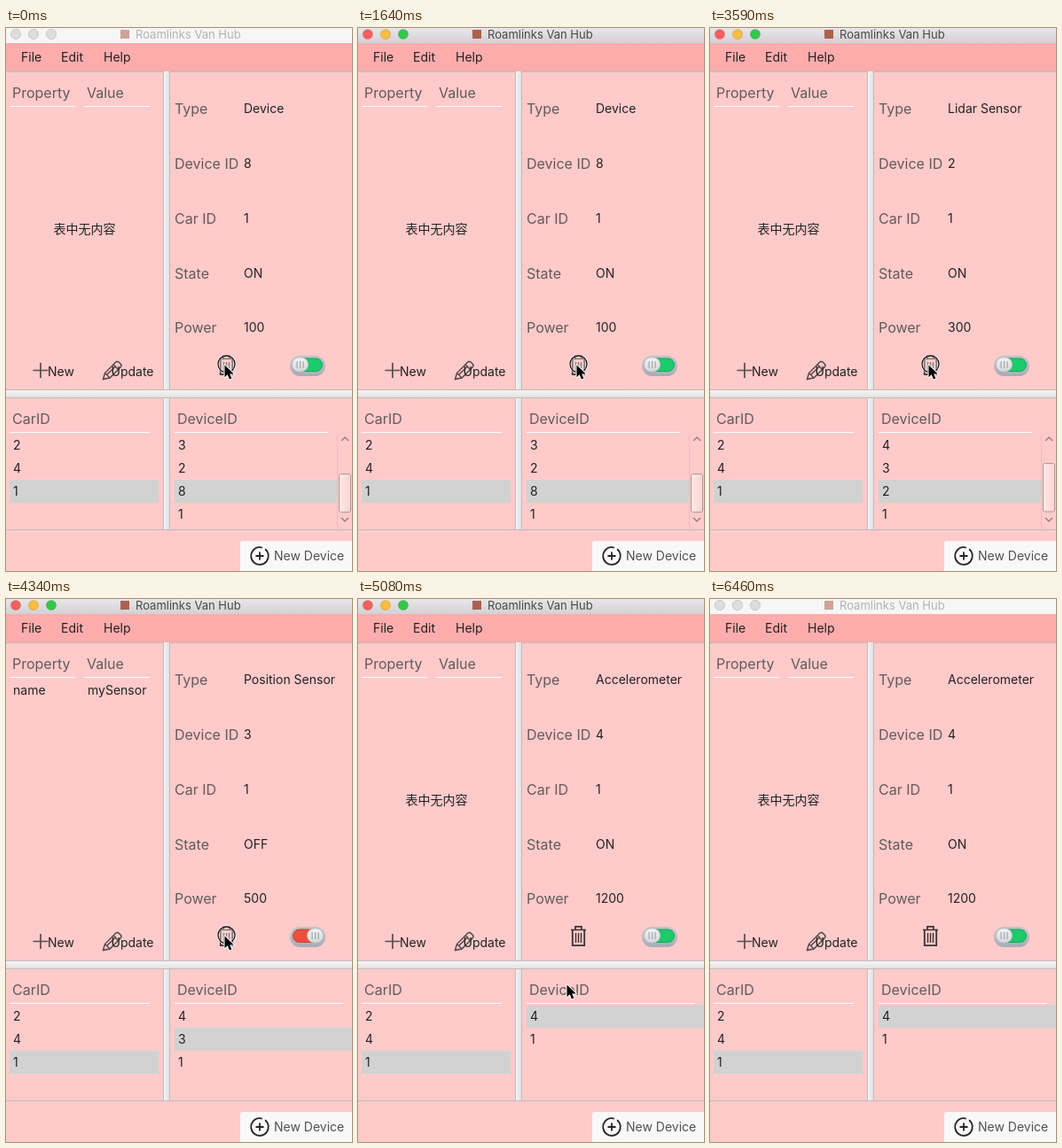
Write an HTML page with a canvas that moves like this. It is 390 by 613 pixels and loops after 6.56 s.

```html
<!DOCTYPE html>
<html lang="en">
<head>
<meta charset="utf-8">
<title>Device panel</title>
<style>
html, body { margin: 0; width: 100%; height: 100%; overflow: hidden; background: #ffcaca; }
canvas { display: block; }
</style>
</head>
<body>
<canvas id="stage" width="390" height="613"></canvas>
<script>
const ctx = document.getElementById('stage').getContext('2d');
const LOOP = 6560;
const INK = '#222', LABEL = '#625a5c', PINK = '#ffcaca', EDGE = '#c3b9ba';

// Each list holds [start time, value] steps.
const DEVICES = [
  [0, { type: 'Device', id: 8, on: true, power: 100, list: [3, 2, 8, 1], thumb: 503 }],
  [1790, { type: 'Lidar Sensor', id: 2, on: true, power: 300, list: [4, 3, 2, 1], thumb: 491 }],
  [3740, { type: 'Position Sensor', id: 3, on: false, power: 500, list: [4, 3, 1], prop: ['name', 'mySensor'] }],
  [4490, { type: 'Accelerometer', id: 4, on: true, power: 1200, list: [4, 1] }]
];
const CURSOR = [
  [0, [245, 379]], [5080, [234, 434]], [5230, [190, 514]], [5380, [163, 522]],
  [5530, [170, 530]], [5680, [283, 563]], [5820, null]
];
const PRESSED = [
  [0, true], [140, false], [1640, true], [1790, false],
  [3590, true], [3740, false], [4340, true], [4490, false]
];
const ACTIVE = [[0, false], [1640, true], [6460, false]];

const at = (steps, t) => steps.filter(s => s[0] <= t).pop()[1];

function rect(x, y, w, h, fill) {
  ctx.fillStyle = fill;
  ctx.fillRect(x, y, w, h);
}

function shape(path, fill, stroke, width = 1) {
  if (fill) { ctx.fillStyle = fill; ctx.fill(path); }
  if (stroke) { ctx.strokeStyle = stroke; ctx.lineWidth = width; ctx.stroke(path); }
}

function round(x, y, w, h, r, fill, stroke, width) {
  const p = new Path2D();
  p.roundRect(x, y, w, h, r);
  shape(p, fill, stroke, width);
}

function circle(x, y, r, fill, stroke, width) {
  round(x - r, y - r, 2 * r, 2 * r, r, fill, stroke, width);
}

const line = (d, color, width) => shape(new Path2D(d), null, color, width);

function text(s, x, y, color = INK, size = 14) {
  ctx.font = `${size}px Inter, "Noto Sans CJK SC", "Noto Sans CJK", sans-serif`;
  ctx.fillStyle = color;
  ctx.fillText(s, x, y);
}

function shade(x0, y0, x1, y1, ...colors) {
  const g = ctx.createLinearGradient(x0, y0, x1, y1);
  colors.forEach((c, i) => g.addColorStop(i / (colors.length - 1), c));
  return g;
}

function titleBar(active) {
  rect(0, 0, 390, 17, active ? shade(0, 0, 0, 17, '#e8e6e8', '#d3d1d3') : '#f6f6f6');
  ['#fc605b', '#fdbc40', '#34c84a'].forEach((c, i) =>
    circle(11 + 20 * i, 7, 5.6, active ? c : '#dddddd', active ? 'rgba(0,0,0,.12)' : '#cbcbcb'));
  rect(129, 2, 10, 10, active ? '#ad604f' : '#d0a298');
  text('Roamlinks Van Hub', 146, 12, active ? '#484848' : '#b2b2b2', 13);
  rect(0, 17, 390, 32, '#ffacac');
  text('File', 17, 38);
  text('Edit', 62, 38);
  text('Help', 110, 38);
}

function dividers() {
  rect(0, 49, 390, 1, EDGE);
  for (const [y, h] of [[49, 359], [418, 148]]) {
    rect(177, y, 8, h, EDGE);
    rect(178, y, 6, h, shade(178, 0, 184, 0, '#f4f2f2', '#e2e0e0'));
  }
  rect(0, 408, 390, 10, EDGE);
  rect(0, 409, 390, 8, shade(0, 409, 0, 417, '#f6f4f4', '#e2e0e0'));
  rect(0, 566, 390, 1, EDGE);
}

function header(s, x, y, left, right) {
  text(s, x, y, LABEL, 16);
  rect(left, y + 9, right - left, 1, '#fff');
}

function rows(items, selected, left, right) {
  items.forEach((item, i) => {
    if (item === selected) rect(left, 458 + 26 * i, right - left, 26, '#d2d2d2');
    text(item, left + 4, 476 + 26 * i);
  });
}

function scrollBar(top) {
  const bottom = top > 500 ? 547 : 546.5;
  rect(373, 458, 1, 108, '#eebcbc');
  line('M378 466l4-4 4 4M378 553l4 4 4-4', '#8b7778', 1.2);
  round(375.5, top + .5, 13, bottom - top - 1, 2, shade(375, 0, 389, 0, '#ffe9e9', '#ffd2d2'), '#a99b9c');
}

function leftPane(prop) {
  header('Property', 7, 79, 4, 78);
  header('Value', 91, 79, 88, 162);
  if (prop) {
    text(prop[0], 8, 108);
    text(prop[1], 92, 108);
  } else {
    text('表中无内容', 53.5, 232);
  }
  line('M30.5 386.5h17M39 378v17', '#574c4d', 1.7);
  text('New', 47, 393);
  line('M109.5 396.5l2-7 12-12q2-2 4 0l1.5 1.5q2 2 0 4l-12 12zM111.5 389.5l5.5 5.5M121 380l5.5 5.5M114 391l10-9.5', '#4c4344', 1.4);
  text('Update', 118.5, 393);
}

function trash() {
  line('M240 373.5h17M245 373v-3.2h7v3.2', '#3c3334', 1.7);
  line('M241.8 374v17.2h13.4V374', '#3c3334', 1.8);
  line('M245.5 377v11M248.5 377v11M251.5 377v11', '#3c3334', 1.4);
}

function toggle(on) {
  round(320, 370, 40, 23, 11.5, shade(0, 370, 0, 393, '#c5c4c8', '#a7adb5'));
  round(323.5, 373, 33, 14.5, 7.25, on ? '#1dcb6c' : '#ec4f3c', on ? '#16a85b' : '#c34334');
  const x = on ? 322.5 : 339.5;
  round(x, 372, 18, 16, 8, shade(0, 372, 0, 388, '#f4f4f5', '#d4d6da'), '#bfc1c6', .8);
  for (let i = -1; i < 2; i++) rect(x + 8.5 + 3.5 * i, 376, 1.3, 8, '#a9abb1');
}

function rightPane(d) {
  const fields = [
    ['Type', d.type, 96], ['Device ID', d.id, 158], ['Car ID', 1, 220],
    ['State', d.on ? 'ON' : 'OFF', 282], ['Power', d.power, 343]
  ];
  for (const [name, value, y] of fields) {
    text(name, 190, y + 1, LABEL, 16);
    text(value, 268, y);
  }
  trash();
  toggle(d.on);
}

function lists(d) {
  header('CarID', 7, 447, 4, 162);
  rows([2, 4, 1], 1, 4, 172);
  header('DeviceID', 193, 447, 190, d.thumb ? 363 : 380);
  rows(d.list, d.id, 190, d.thumb ? 373 : 390);
  if (d.thumb) scrollBar(d.thumb);
}

function newDevice() {
  round(264, 579, 130, 40, 3, '#f8f8f8');
  ctx.beginPath();
  ctx.arc(286, 596, 9.8, -.9, 5);
  ctx.strokeStyle = '#252525';
  ctx.lineWidth = 1.8;
  ctx.stroke();
  line('M281.5 596h9M286 591.5v9', '#252525', 1.8);
  text('New Device', 302, 601, '#505050');
}

function pointer([x, y]) {
  ctx.save();
  ctx.translate(x, y);
  ctx.lineJoin = 'round';
  shape(new Path2D('M1.5 1.5V15.2l3.2-3 2.2 5.3 2.5-1.1-2.2-5h4.5z'), '#000', '#fff', 2);
  shape(new Path2D('M1.5 1.5V15.2l3.2-3 2.2 5.3 2.5-1.1-2.2-5h4.5z'), '#000');
  ctx.restore();
}

function draw(t) {
  const device = at(DEVICES, t), cursor = at(CURSOR, t);
  rect(0, 0, 390, 613, PINK);
  titleBar(at(ACTIVE, t));
  dividers();
  leftPane(device.prop);
  rightPane(device);
  lists(device);
  newDevice();
  if (at(PRESSED, t)) {
    circle(248.5, 379.5, 9.7, 'rgba(255,225,225,.4)', 'rgba(255,255,255,.7)', 2.4);
    circle(248.5, 379.5, 9.5, null, '#1c1818', 1.3);
  }
  if (cursor) pointer(cursor);
}

const start = performance.now();
function tick() {
  draw((performance.now() - start) % LOOP);
  requestAnimationFrame(tick);
}
tick();
</script>
</body>
</html>
```
